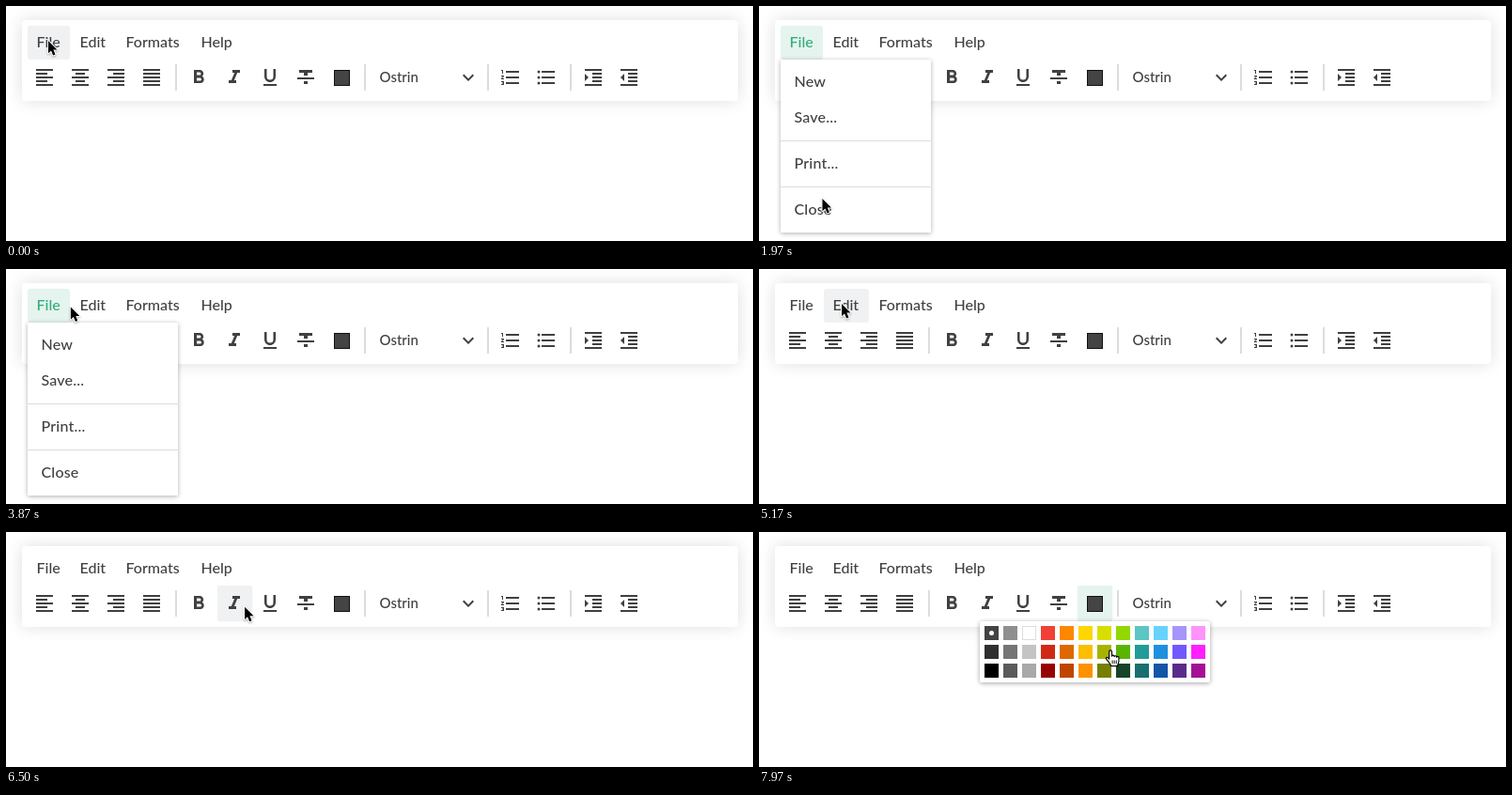
These frames come from a looping animation (795 by 250 pixels, 8 s). An HTML page with a canvas:

```html
<!DOCTYPE html>
<html lang="en">
<head>
<meta charset="utf-8">
<title>Editor toolbar</title>
<style>
html, body { margin: 0; width: 100%; height: 100%; overflow: hidden; background: #fff; }
canvas { display: block; width: 795px; height: 250px; }
</style>
</head>
<body>
<canvas id="stage"></canvas>
<script>
const W = 795, H = 250, LOOP = 8000;
const canvas = document.getElementById('stage');
const ctx = canvas.getContext('2d');
const dpr = window.devicePixelRatio || 1;
canvas.width = W * dpr;
canvas.height = H * dpr;

const INK = '#404040', GREEN = '#32ad79', MINT = '#e5f4ef', GREY = '#f0f1f2';
const FONT = 'Lato, "Open Sans", sans-serif';

// Pointer trips: [time, x, y]; every trip starts and ends at rest
const trips = [
  [[1300, 45, 37], [1450, 57, 59], [2100, 68, 216.5]],
  [[2650, 68, 216.5], [2870, 66, 185], [3450, 58, 44], [3870, 68.8, 40.5], [4120, 88, 37]],
  [[5470, 88, 37], [6020, 149, 71], [6270, 198, 77], [7050, 355, 83.5]],
  [[7400, 357, 83], [7970, 374, 126]]
];
const FILE_OPEN = 300, EDIT_OPEN = 3940, MENU_CLOSE = 5170, NUDGE = 7200, PALETTE_OPEN = 7400;
const HOVER_LAG = 70;

const tabs = [
  { label: 'File', x: 23, w: 45 },
  { label: 'Edit', x: 69, w: 48 },
  { label: 'Formats', x: 118, w: 79 },
  { label: 'Help', x: 198, w: 53 }
];
const menus = {
  File: { x: 23, items: ['New', 'Save...', '-', 'Print...', '-', 'Close'] },
  Edit: { x: 68, items: ['Cut', 'Copy', 'Paste'] }
};

// Icons on a 24 px grid
const bars = (x, w, ys) => ys.map(y => `M${x} ${y}h${w}v2h${-w}z`).join('');
const wide = bars(3, 18, [3, 11, 19]);
const dot = y => `M2.5 ${y}a1.5 1.5 0 1 0 3 0a1.5 1.5 0 1 0 -3 0z`;
const indent = bars(3, 18, [3, 19]) + bars(11, 10, [7, 11, 15]);
const icons = [
  [41, wide + bars(3, 12, [7, 15])],
  [79, wide + bars(7, 10, [7, 15])],
  [117, wide + bars(9, 12, [7, 15])],
  [155, wide + bars(3, 18, [7, 15])],
  [205, 'M15.6 10.8c1-.7 1.6-1.8 1.6-2.8 0-2.3-1.7-4-4-4H7v14h7c2.100 0 3.700-1.700 3.700-3.800 0-1.500-.8-2.800-2.100-3.400zM10 6.500h3a1.500 1.500 0 0 1 0 3h-3zM13.500 15.500H10v-3h3.500a1.500 1.500 0 0 1 0 3z'],
  [243, 'M10 4v3h2.2l-3.400 8H6v3h8v-3h-2.200l3.400-8H18V4z'],
  [281, 'M12 17c3.300 0 6-2.700 6-6V3h-2.500v8a3.500 3.500 0 0 1-7 0V3H6v8c0 3.300 2.700 6 6 6zM5 19v2h14v-2z'],
  [319, 'M10 19h4v-3h-4zM5 4v3h5v3h4V7h5V4zM3 14h18v-2H3z'],
  [357, ''],
  [537, 'M2 17h2v.5H3v1h1v.5H2v1h3v-4H2zM3 8h1V4H2v1h1zM2 11h1.800L2 13.100v.9h3v-1H3.200L5 10.900V10H2z' + bars(7, 14, [5, 11, 17])],
  [575, dot(6) + dot(12) + dot(18) + bars(7, 14, [5, 11, 17])],
  [625, indent + 'M3 8v8l4-4z'],
  [663, indent + 'M7 8v8l-4-4z']
].map(([x, d]) => ({ x, path: new Path2D(d) }));
const chevron = new Path2D('M7.4 8.600L12 13.200l4.600-4.600L18 10l-6 6-6-6z');

const palette = [
  '#434343 #8f8f8f #ffffff #ef4136 #ff8700 #ffd600 #d9de00 #93d700 #5bc6c3 #66d3ff #a695fb #ff93fb',
  '#2f2f2f #757575 #c4c4c4 #cf2a16 #e06800 #fdbd00 #a8b300 #5bb500 #229c9a #1f90df #7159ff #ff1fff',
  '#000000 #5b5b5b #a9a9a9 #960200 #c04500 #ff9200 #757f00 #174427 #1a6f70 #1156a8 #5b2b8c #a41095'
].map(row => row.split(' '));

const arrow = new Path2D('M0 0V13.300L3 10.500L5.100 15.500L7.500 14.500L5.400 9.600H9.500Z');
const hand = new Path2D('M4.200 10.200V2.300a1.400 1.400 0 0 1 2.800 0V7.200a1.300 1.300 0 0 1 2.600 .4a1.300 1.300 0 0 1 2.500 .6a1.200 1.200 0 0 1 2.300 .8V12.500c0 2.200-1.300 3-1.300 5H6.200c0-1.600-1.700-3-2.800-4.600C2.600 11.700 1.400 10.900 1 10c-.6-1.300 .9-2.100 1.900-1.200Z');
const knuckles = new Path2D('M7.600 11.500v3.500M9.700 11.500v3.500M11.800 11.500v3.500');

function along(pts, t) {
  let i = 0;
  while (i < pts.length - 2 && t > pts[i + 1][0]) i++;
  const a = pts[i], b = pts[i + 1], d = b[0] - a[0], u = (t - a[0]) / d;
  const slope = (j, k) => j === 0 || j === pts.length - 1 ? 0 :
    (pts[j + 1][k] - pts[j - 1][k]) / (pts[j + 1][0] - pts[j - 1][0]);
  const s = u * u * (3 - 2 * u);
  return [1, 2].map(k => a[k] + (b[k] - a[k]) * s +
    d * (u * (1 - u) * (1 - u) * slope(i, k) - u * u * (1 - u) * slope(i + 1, k)));
}

function pointer(t) {
  if (t >= NUDGE && t < PALETTE_OPEN) return [357, 83];
  let p = [45, 37];
  for (const trip of trips) {
    if (t >= trip[0][0]) p = along(trip, Math.min(t, trip[trip.length - 1][0]));
  }
  return p;
}

function box(x, y, w, h, r, fill, shadow) {
  ctx.save();
  if (shadow) {
    ctx.shadowColor = shadow[0];
    ctx.shadowBlur = shadow[1] * dpr;
    ctx.shadowOffsetY = shadow[2] * dpr;
  }
  ctx.fillStyle = fill;
  ctx.beginPath();
  ctx.roundRect(x, y, w, h, r);
  ctx.fill();
  ctx.restore();
}

function text(s, x, y, color = INK, size = 16, spacing = 0) {
  ctx.font = `500 ${size}px ${FONT}`;
  ctx.letterSpacing = spacing + 'px';
  ctx.fillStyle = color;
  ctx.fillText(s, x, y);
}

function shape(path, x, y) {
  ctx.save();
  ctx.translate(x, y);
  ctx.fillStyle = INK;
  ctx.fill(path);
  ctx.restore();
}

function drawBar(open, paletteOpen, hx, hy) {
  box(17, 15, 762, 86, 4, '#fff', ['rgba(0,0,0,.13)', 18, 0]);
  const menu = menus[open];
  const inMenu = menu && hy >= 57 && hx >= menu.x && hx < menu.x + 160;
  for (const tab of tabs) {
    const on = tab.label === open;
    const over = hy >= 21 && hy < 57 && hx >= tab.x && hx < tab.x + tab.w;
    if (on || over) box(tab.x, 21, tab.w, 36, 3, on ? MINT : GREY);
    text(tab.label, tab.x + 9.5, 44, on ? GREEN : INK);
  }
  for (const { x, path } of icons) {
    const on = paletteOpen && x === 357;
    const over = !inMenu && hy >= 57 && hy < 95 && Math.abs(hx - x) < 18.75;
    if (on || over) box(x - 18.25, 57, 37.5, 38, 3, on ? MINT : GREY);
    shape(path, x - 12, 64);
  }
  box(349, 68, 17, 17, 0, '#111');
  box(350, 69, 15, 15, 0, '#444');
  for (const x of [181, 382, 513, 601]) box(x - .75, 62, 1.5, 28, 0, '#d0d1d2');
  text('Ostrin', 397.5, 81, INK, 15);
  shape(chevron, 480, 64);
}

function drawMenu({ x, items }, hx, hy) {
  const h = 10 + items.reduce((sum, s) => sum + (s === '-' ? 11 : 38), 0);
  box(x, 57, 160, h, 1, '#fff', ['rgba(0,0,0,.32)', 5, 1]);
  let y = 61.5;
  for (const s of items) {
    if (s === '-') {
      box(x, Math.round(y + 5), 160, 1, 0, '#dcdddf');
      y += 11;
      continue;
    }
    if (hx >= x && hx < x + 160 && hy >= y && hy < y + 38) {
      box(x, Math.round(y), 160, 38, 0, GREY);
    }
    text(s, x + 14.5, Math.round(y + 24), INK, 16, .2);
    y += 38;
  }
}

function drawPalette() {
  box(235, 95, 245, 65, 2, '#fff', ['rgba(0,0,0,.36)', 5, 1]);
  palette.forEach((row, r) => row.forEach((color, c) => {
    const x = 240 + c * 20, y = 100 + r * 20;
    if (color === '#ffffff') box(x, y, 15, 15, 0, '#dddddd');
    const pad = color === '#ffffff' ? 1 : 0;
    box(x + pad, y + pad, 15 - 2 * pad, 15 - 2 * pad, 0, color);
  }));
  box(245, 105, 5, 5, 2.5, '#fff');
}

function drawPointer(x, y, overCell) {
  ctx.save();
  ctx.lineJoin = 'round';
  ctx.shadowColor = 'rgba(0,0,0,.3)';
  ctx.shadowBlur = 2 * dpr;
  ctx.shadowOffsetY = dpr;
  if (overCell) {
    ctx.translate(x - 5.5, y - 1);
    ctx.fillStyle = '#fff';
    ctx.fill(hand);
    ctx.shadowColor = 'transparent';
    ctx.strokeStyle = '#000';
    ctx.lineWidth = 1.1;
    ctx.stroke(hand);
    ctx.lineWidth = .9;
    ctx.stroke(knuckles);
  } else {
    ctx.translate(x, y);
    ctx.strokeStyle = '#fff';
    ctx.lineWidth = 2;
    ctx.stroke(arrow);
    ctx.shadowColor = 'transparent';
    ctx.fillStyle = '#000';
    ctx.fill(arrow);
  }
  ctx.restore();
}

function draw(t) {
  const [x, y] = pointer(t);
  const [hx, hy] = pointer(Math.max(0, t - HOVER_LAG));
  const open = t < FILE_OPEN || t >= MENU_CLOSE ? '' : t < EDIT_OPEN ? 'File' : 'Edit';
  const paletteOpen = t >= PALETTE_OPEN;
  ctx.setTransform(dpr, 0, 0, dpr, 0, 0);
  ctx.fillStyle = '#fff';
  ctx.fillRect(0, 0, W, H);
  drawBar(open, paletteOpen, hx, hy);
  if (open) drawMenu(menus[open], hx, hy);
  if (paletteOpen) drawPalette();
  drawPointer(x, y, paletteOpen && y > 100);
}

const start = performance.now();
function tick() {
  draw((performance.now() - start) % LOOP);
  requestAnimationFrame(tick);
}
tick();
</script>
</body>
</html>
```
